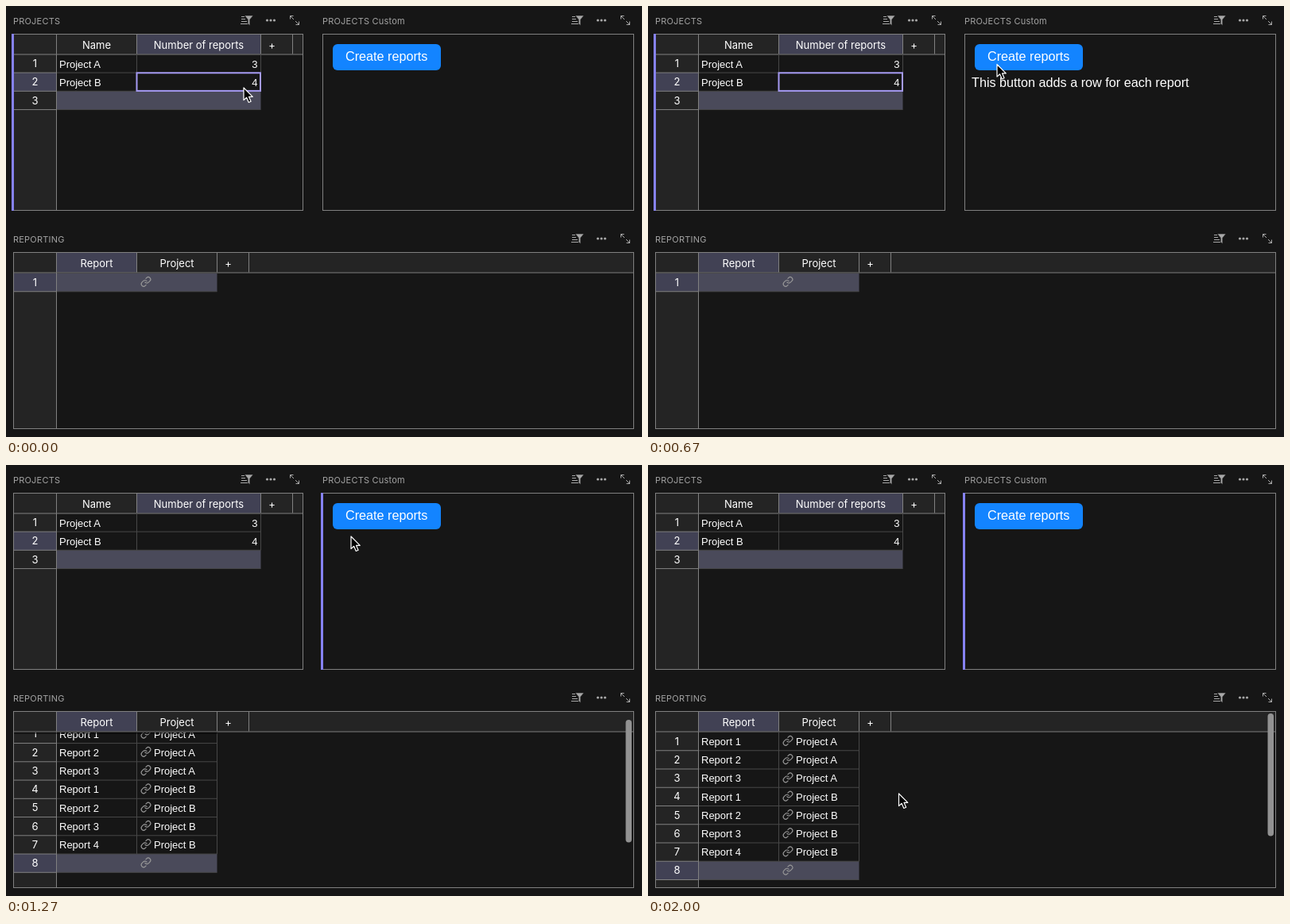
An HTML page for the animation above (2710 ms loop, 800 by 543 pixels).

```html
<!DOCTYPE html>
<html lang="en">
<head>
<meta charset="utf-8">
<title>Create reports</title>
<style>
  html, body { margin: 0; width: 100%; height: 100%; overflow: hidden; background: #161616; }
  svg { display: block; }
  text { fill: #fff; }
  .ui { font: 13px Inter, Roboto, sans-serif; }
  .cell { font: 13px "Liberation Sans", Arial, sans-serif; }
  .big { font: 16.2px "Liberation Sans", Arial, sans-serif; }
  .title { font: 11px Inter, Roboto, sans-serif; letter-spacing: .2px; fill: #a3a3a3; }
</style>
</head>
<body>
<script>
const NS = 'http://www.w3.org/2000/svg';
const LOOP = 2710, ROW = 23.25;
const C = {
  bg: '#161616', head: '#242424', picked: '#414154', add: '#4a4a5a',
  line: '#808080', cellLine: '#474747', icon: '#a8a8a8', active: '#8682f2', cursor: '#a59af2'
};

function add(parent, tag, attrs = {}, content) {
  const el = document.createElementNS(NS, tag);
  for (const k in attrs) el.setAttribute(k, attrs[k]);
  if (content !== undefined) el.textContent = content;
  return parent.appendChild(el);
}
const group = (p, attrs) => add(p, 'g', attrs);
const box = (p, x, y, width, height, fill, more) => add(p, 'rect', { x, y, width, height, fill, ...more });
const line = (p, d, stroke = C.line, more) => add(p, 'path', { d, stroke, fill: 'none', ...more });
const label = (p, x, y, s, cls = 'ui', anchor = 'start') =>
  add(p, 'text', { x, y, class: cls, 'text-anchor': anchor }, s);

const svg = add(document.body, 'svg', { width: 800, height: 543, viewBox: '0 0 800 543' });
const clip = add(add(svg, 'defs'), 'clipPath', { id: 'body' });
box(clip, 9, 337, 780, 195);
box(svg, 0, 0, 800, 543, C.bg);

function toolbar(x, y) {
  const g = group(svg, { transform: `translate(${x} ${y})` });
  line(g, 'M-6 -4.5h4M-6 -1.5h5M-6 1.5h7M-7 4.5h9', C.icon, { 'stroke-width': 1.2 });
  add(g, 'path', { d: 'M-2 -6h11l-4.2 5v7.5l-2.6 -2v-5.5z', fill: C.icon, stroke: C.bg, 'stroke-width': .6 });
  for (const cx of [26.5, 31, 35.5]) add(g, 'circle', { cx, cy: 0, r: 1.6, fill: C.icon });
  line(g, 'M55.5 -1.5v-4h4M55.5 -5.5l4.5 4.5M66.5 1.5v4h-4M66.5 5.5l-4.5 -4.5', C.icon);
}

function frame(x, y, w, title, toolX) {
  label(svg, x - .5, y - 12.5, title, 'title');
  toolbar(toolX, y - 17.5);
  return box(svg, x, y, w, 222, 'none', { stroke: C.line });
}

// Column titles and the row number strip; cols are the x edges of each title cell.
function header(p, y, cols, names, pick, right) {
  box(p, 10, y + .5, right - 10, 24.5, C.head);
  box(p, cols[pick], y + .5, cols[pick + 1] - cols[pick], 24.5, C.picked);
  names.forEach((s, i) => label(p, (cols[i] + cols[i + 1]) / 2 - (s === '+' ? 6 : 0), y + 18, s, 'ui', 'middle'));
  line(p, cols.map(x => `M${x} ${y}v25`).join('') + `M9 ${y + 25.5}H${right}`);
}

function strip(y) {
  box(svg, 10, y, 53.5, 222, C.head);
  line(svg, `M63.5 ${y}v222`);
}

function linkIcon(p, y) {
  line(p, 'M10 13a5 5 0 0 0 7.54.54l3-3a5 5 0 0 0-7.07-7.07l-1.72 1.71M14 11a5 5 0 0 0-7.54-.54l-3 3a5 5 0 0 0 7.07 7.07l1.71-1.71',
    '#999', { transform: `translate(169 ${y - 7}) scale(.585)`, 'stroke-width': 1.9, 'stroke-linecap': 'round' });
}

// Rows with their lines, then the highlighted row for a new record.
function rows(p, top, data, right, picked, drawRow) {
  const end = data.length;
  const yAt = i => top + i * ROW;
  box(p, 10, yAt(picked), 53, ROW, C.picked);
  box(p, 64, yAt(end), right - 64, ROW, C.add);
  for (let i = 0; i <= end; i++) {
    const y = yAt(i);
    label(p, 36.5, y + 16.2, i + 1, 'ui', 'middle');
    line(p, `M10 ${y + ROW}H63`);
    line(p, `M64 ${y + ROW}H${right}`, C.cellLine);
    if (i < end) drawRow(data[i], y);
  }
  line(p, `M164.5 ${top}V${yAt(end)}M${right} ${top}V${yAt(end)}`, C.cellLine);
  line(p, `M63.5 ${top}V${yAt(end + 1)}`);
}

// Projects table
strip(35.5);
header(svg, 35.5, [63.5, 164.5, 320.5, 360.5], ['Name', 'Number of reports', '+'], 1, 373);
rows(svg, 60.8, [['Project A', 3], ['Project B', 4]], 320.5, 1, ([name, n], y) => {
  label(svg, 67, y + 16.8, name, 'cell');
  label(svg, 316.5, y + 16.8, n, 'cell', 'end');
});
frame(9.5, 35.5, 364, 'PROJECTS', 302);
const leftActive = group(svg);
box(leftActive, 7, 35, 3, 223, C.active);
box(leftActive, 164.5, 84.3, 155.5, 22.6, 'none', { stroke: C.cursor, 'stroke-width': 2 });

// Custom widget
frame(398.5, 35.5, 391, 'PROJECTS Custom', 718);
const rightActive = box(svg, 396, 35, 3, 223, C.active);
box(svg, 411, 48, 136, 33, '#1384ff', { rx: 6 });
label(svg, 427, 69, 'Create reports', 'big');
const hint = label(svg, 407, 102, 'This button adds a row for each report', 'big');

// Reporting table
const reports = [['A', 3], ['B', 4]].flatMap(([p, n]) =>
  Array.from({ length: n }, (_, i) => [`Report ${i + 1}`, `Project ${p}`]));
strip(310.5);
const view = group(svg, { 'clip-path': 'url(#body)' });
function reportRows(data) {
  const g = group(view);
  rows(g, 336.5, data, 265.5, data.length, ([report, project], y) => {
    label(g, 67, y + 16.3, report, 'cell');
    linkIcon(g, y + 10.8);
    label(g, 186, y + 16.3, project, 'cell');
  });
  linkIcon(g, 336.5 + data.length * ROW + 10.8);
  return g;
}
const emptyRows = reportRows([]);
const fullRows = reportRows(reports);
header(svg, 310.5, [63.5, 164.5, 265.5, 305.5], ['Report', 'Project', '+'], 0, 789);
const shade = box(svg, 10, 336.5, 256, 2.5, '#000', { opacity: .45 });
frame(9.5, 310.5, 780, 'REPORTING', 718);
const thumb = box(svg, 779.5, 313, 7.5, 154.5, '#929292', { rx: 3.75 });

const pointer = add(svg, 'path', {
  d: 'M0 0v15.6l3.6-3.3 2.7 6.2 2.8-1.2-2.6-6h4.8z',
  fill: '#000', stroke: '#fff', 'stroke-width': 1.2, 'stroke-linejoin': 'round'
});

// Steps are [time, value...]
const path = [
  [70, 299, 103], [130, 305, 107], [200, 325, 117], [280, 360, 122], [370, 395.5, 117.5],
  [450, 424, 102], [510, 437, 84], [570, 439, 75], [640, 439, 73.5], [1190, 439, 73.5],
  [1270, 434, 90], [1330, 420, 133], [1420, 371, 270], [1500, 331, 376], [1570, 315.5, 414]
];
const scroll = [[1170, 0], [1260, 9.2], [1870, 9.2], [2000, 0]];
const hintFade = [[520, 0], [570, 1], [1220, 1], [1250, 0]];
const thumbFade = [[1140, 0], [1170, .22], [1260, 1]];

function at(steps, t) {
  if (t <= steps[0][0]) return steps[0].slice(1);
  const i = steps.findIndex(s => s[0] > t);
  if (i < 0) return steps[steps.length - 1].slice(1);
  const a = steps[i - 1], b = steps[i], k = (t - a[0]) / (b[0] - a[0]);
  return a.slice(1).map((v, j) => v + (b[j + 1] - v) * k);
}
const show = (el, on) => el.setAttribute('display', on ? 'inline' : 'none');

function draw(t) {
  // The screen refreshes every 30 ms.
  const tick = t >= 2000 ? t : Math.floor((t - 10) / 30) * 30 + 10;
  const [x, y] = at(path, tick);
  const [offset] = at(scroll, tick);
  pointer.setAttribute('transform', `translate(${x} ${y})`);
  fullRows.setAttribute('transform', `translate(0 ${-offset})`);
  thumb.setAttribute('transform', `translate(0 ${offset * .87})`);
  thumb.setAttribute('opacity', at(thumbFade, tick)[0]);
  hint.setAttribute('opacity', at(hintFade, tick)[0]);
  show(leftActive, t < 970);
  show(rightActive, t >= 970);
  show(emptyRows, t < 1170);
  show(fullRows, t >= 1170);
  show(shade, offset > 0);
}

const start = performance.now();
function loop() {
  draw((performance.now() - start) % LOOP);
  requestAnimationFrame(loop);
}
loop();
</script>
</body>
</html>
```
